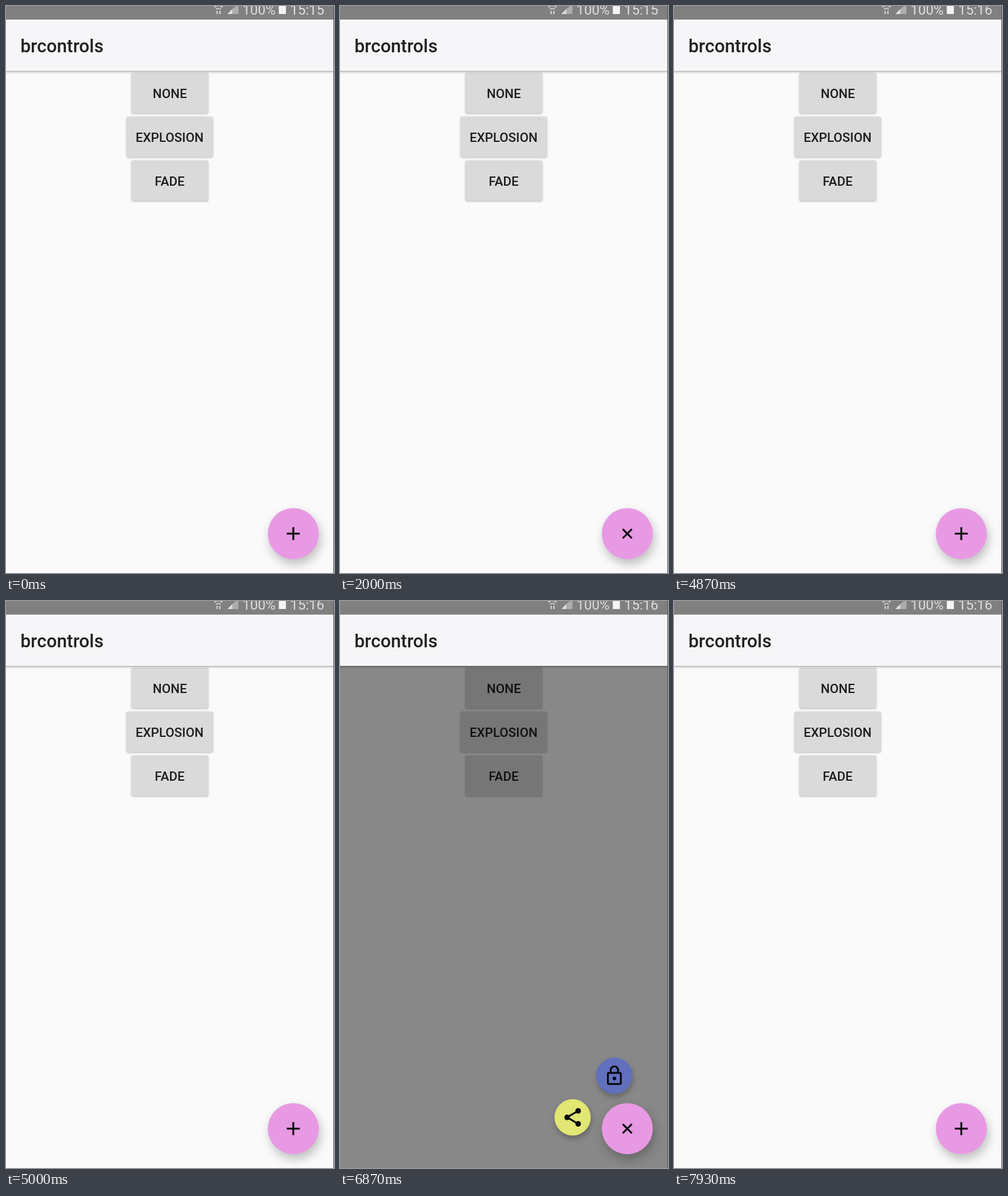
An HTML page that plays this animation: 532x918 px, repeating every 8 s.

```html
<!DOCTYPE html>
<html lang="en">
<head>
<meta charset="utf-8">
<title>Floating action button</title>
<style>
  html, body { margin: 0; width: 100%; height: 100%; overflow: hidden; background: #fafafb; }
  svg { display: block; width: 100vw; height: 100vh; }
  text { font-family: Roboto, sans-serif; }
  .label { font-size: 20.7px; font-weight: 500; fill: #1d1d1f; text-anchor: middle; }
  .button { fill: #dadada; filter: drop-shadow(0 1px 1.5px rgba(0, 0, 0, .28)); }
  .mini { filter: drop-shadow(1px 5px 4px rgba(0, 0, 0, .25)); }
  .main { filter: drop-shadow(3px 8px 8px rgba(0, 0, 0, .24)); }
  .line { fill: none; stroke: #08080c; }
</style>
</head>
<body>
<svg viewBox="0 0 532 918" preserveAspectRatio="none">
  <defs>
    <linearGradient id="barShadow" x2="0" y2="1">
      <stop stop-color="#000" stop-opacity=".3"/>
      <stop offset=".4" stop-color="#000" stop-opacity=".12"/>
      <stop offset="1" stop-color="#000" stop-opacity="0"/>
    </linearGradient>
    <clipPath id="pressArea"><rect x="195.5" y="179" width="140" height="65.5" rx="3"/></clipPath>
  </defs>
  <rect width="532" height="918" fill="#fafafb"/>

  <rect class="button" x="203.5" y="108" width="124.5" height="65.5" rx="3"/>
  <rect class="button" x="195.5" y="179" width="140" height="65.5" rx="3"/>
  <rect class="button" x="203.5" y="250" width="124.5" height="65.5" rx="3"/>
  <circle id="press" cx="280" cy="215" clip-path="url(#pressArea)"/>
  <text class="label" x="265.7" y="148.8">NONE</text>
  <text class="label" x="265.3" y="219.6">EXPLOSION</text>
  <text class="label" x="265.5" y="290.6">FADE</text>

  <rect id="dim" y="105" width="532" height="813" fill="#000" opacity=".46"/>
  <rect y="105" width="532" height="5" fill="url(#barShadow)"/>
  <rect y="22" width="532" height="83" fill="#f6f6f9"/>
  <text x="23.5" y="75.2" font-size="29.5" font-weight="500" fill="#202022">brcontrols</text>

  <rect width="532" height="22" fill="#808080"/>
  <g fill="none" stroke="#dcdcdc" stroke-width="1.6">
    <path d="M338 2q6.500-5 13 0M340.500 5.500q4-3 8 0"/>
    <path d="M342.500 13V8M347 8v5" stroke-width="2"/>
  </g>
  <path d="M377 13V-3L367 5v8z" fill="#adadad"/>
  <path d="M359 13h8V5z" fill="#dedede"/>
  <g font-size="22.2" fill="#dedede">
    <text x="383.500" y="13.500">100%</text>
    <text id="clock" x="461" y="13.500">15:15</text>
  </g>
  <rect x="442.500" y="-2" width="11.500" height="15" fill="#f4f4f4"/>
  <rect x="531" width="1" height="918" fill="#55555a"/>

  <g id="lock" class="mini">
    <circle r="29.4" fill="#6070be"/>
    <g class="line" transform="scale(1.5) translate(-12 -12)" stroke-width="2">
      <rect x="5" y="9" width="14" height="12" rx="1"/>
      <path d="M8 9V6a4 4 0 0 1 8 0v3"/>
      <circle cx="12" cy="15" r="1" stroke-width="2"/>
    </g>
  </g>
  <g id="share" class="mini">
    <circle r="29.4" fill="#e2e673"/>
    <g transform="scale(1.5) translate(-12 -12)" fill="#08080c">
      <path class="line" d="M18 5L6 12l12 7" stroke-width="2"/>
      <circle cx="18" cy="5" r="3"/><circle cx="6" cy="12" r="3"/><circle cx="18" cy="19" r="3"/>
    </g>
  </g>
  <g transform="translate(466 854.3)">
    <circle class="main" r="41.4" fill="#e899e3"/>
    <circle id="tap" cx="16" cy="2"/>
    <path id="plus" class="line" d="M-10.500 0h21M0-10.500v21" stroke-width="3"/>
  </g>
</svg>
<script>
  const LOOP = 8000, MOVE = 400;
  const HOME = [466, 854.3];
  const SPOTS = { lock: [445, 768.6], share: [377.3, 836] };
  const CYCLES = [
    { open: 925, close: 1990, explode: false },
    { open: 5080, close: 6965, explode: true },
  ];
  const byId = id => document.getElementById(id);
  const clamp = v => Math.min(1, Math.max(0, v));
  const ease = v => (1 - Math.cos(Math.PI * clamp(v))) / 2;

  function ripple(id, t, start, length, radius, strength) {
    const p = clamp((t - start) / length);
    byId(id).setAttribute('r', radius * (.35 + .65 * p));
    byId(id).setAttribute('opacity', strength * Math.sin(Math.PI * p));
  }

  function draw(t) {
    const cycle = CYCLES[t < 4000 ? 0 : 1];
    const isOpen = t >= cycle.open && t < cycle.close;
    const turn = ease((t - cycle.open) / MOVE) - ease((t - cycle.close) / MOVE);
    const spread = cycle.explode ? turn : +isOpen;

    byId('dim').style.display = isOpen ? '' : 'none';
    byId('plus').setAttribute('transform', `rotate(${45 * turn})`);
    byId('clock').textContent = t < 3070 ? '15:15' : '15:16';
    for (const [id, spot] of Object.entries(SPOTS)) {
      const [x, y] = HOME.map((h, i) => h + (spot[i] - h) * spread);
      byId(id).setAttribute('transform', `translate(${x} ${y})`);
      byId(id).style.display = spread > .001 ? '' : 'none';
    }
    ripple('press', t, 3530, 600, 90, .08);
    ripple('tap', t, 6860, 280, 22, .06);
  }

  const began = performance.now();
  function tick() {
    draw((performance.now() - began) % LOOP);
    requestAnimationFrame(tick);
  }
  tick();
</script>
</body>
</html>
```
